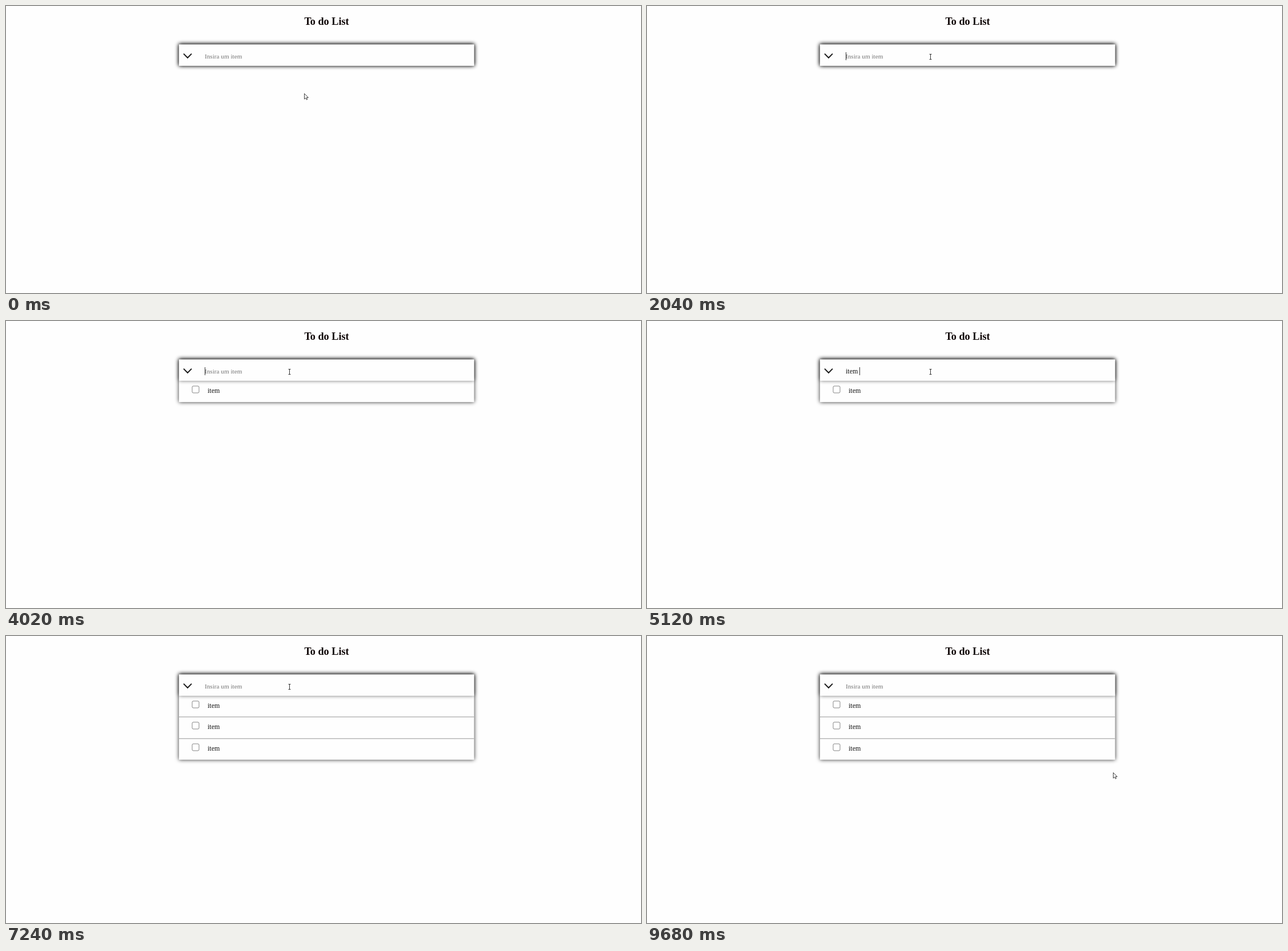
An HTML page for the animation above (9.78 s loop, 1112 by 503 pixels).

```html
<!DOCTYPE html>
<html lang="pt">
<head>
<meta charset="utf-8">
<title>To do List</title>
<style>
  html, body { margin: 0; width: 100%; height: 100%; overflow: hidden; background: #fefefe; }
  svg { display: block; width: 100vw; height: 100vh; }
  text { font-family: "Liberation Serif", "Times New Roman", serif; font-size: 12px; fill: #111; white-space: pre; }
  .title { font-size: 18.2px; font-weight: bold; fill: #0d0404; text-anchor: middle; }
  .hint { font-size: 11.22px; fill: #757575; }
  .paper { fill: #fefefe; }
</style>
</head>
<body>
<svg viewBox="0 0 1112 503">
  <defs>
    <filter id="blur" filterUnits="userSpaceOnUse" x="270" y="40" width="590" height="220">
      <feGaussianBlur stdDeviation="3.75"/>
    </filter>
  </defs>
  <text class="title" x="561.5" y="32.5">To do List</text>

  <rect id="listShadow" x="302.9" y="67.4" width="516.8" filter="url(#blur)" fill-opacity=".85"/>
  <rect id="list" class="paper" x="302.9" y="67.4" width="516.8"/>
  <rect x="302.9" y="66.4" width="516.8" height="37.4" filter="url(#blur)" fill-opacity=".75"/>
  <rect class="paper" x="302.9" y="67.4" width="516.8" height="37.4"/>
  <g id="rows"></g>

  <path d="M311 83.6L318 90.8L325 83.6" fill="none" stroke="#1c1c1c" stroke-width="2"/>
  <text id="hint" class="hint" x="348" y="92">Insira um item</text>
  <text id="typed" x="348" y="92"></text>
  <rect id="caret" y="81" width="1" height="14" fill="#333"/>
  <path id="remove" d="M767.4 115.7L778 126.3M778 115.7L767.4 126.3" stroke="#9fd3ee" stroke-width="1.2"/>

  <path id="arrow" d="M.5 .5V10.2L2.8 8.1L4.3 11.3L5.8 10.6L4.4 7.5H7.4Z" fill="#fff" stroke="#222" stroke-width=".85"/>
  <path id="beam" d="M-2 -4.5H2M-2 4.5H2M0 -4.5V4.5" fill="none" stroke="#333"/>
</svg>
<script>
const LOOP = 9780, TOP = 67.4, ROW = 37.35, WORD = "item ";
const $ = id => document.getElementById(id);
const show = (el, on) => el.setAttribute("visibility", on ? "visible" : "hidden");
const place = (el, x, y) => el.setAttribute("transform", `translate(${x} ${y})`);

const rows = [0, 1, 2].map(i => {
  const g = document.createElementNS("http://www.w3.org/2000/svg", "g");
  const line = i ? '<rect x="302.9" y="104" width="516.8" height="1.5" fill="#b8b8b8"/>' : "";
  g.innerHTML = line +
    '<rect x="326" y="114" width="12" height="12" rx="2" fill="#fff" stroke="#858585"/>' +
    '<text x="353" y="126">item</text>';
  place(g, 0, Math.round(i * ROW));
  $("rows").append(g);
  return g;
});

const enters = [4020, 5420, 6720];
const typing = [[2240, 2610], [4720, 5120], [6000, 6360]];
// The caret toggles at each of these times, starting hidden.
const blinks = [1020, 1550, 2040, 3140, 3660, 4550, 4720, 5950, 6000, 7240, 7770, 8300, 8810, 9340];

// Pointer moves: start, end, steps, from, to, easing exponents
const moves = [
  [20, 500, 13, [522, 153], [497, 94], 1, 1],
  [660, 720, 3, [497, 94], [497, 91], 1, 1],
  [980, 1170, 5, [497, 91], [497, 89], 1, 1],
  [8300, 8610, 9, [497, 89], [812, 241], 1.2, 1.4],
  [9510, 9680, 3, [812, 241], [815.5, 239], 1, 1]
];

function stepped(t, start, end, steps) {
  if (t < start) return 0;
  return Math.min(steps, 1 + Math.floor((t - start) / (end - start) * (steps - 1)));
}

function pointer(t) {
  let pos = moves[0][3];
  for (const [start, end, steps, from, to, ex, ey] of moves) {
    if (t < start) break;
    const p = stepped(t, start, end, steps) / steps;
    pos = [from[0] + (to[0] - from[0]) * p ** ex, from[1] + (to[1] - from[1]) * p ** ey];
  }
  return pos;
}

function draw(t) {
  const count = enters.filter(e => t >= e).length;
  const span = typing[count];
  const letters = span ? stepped(t, ...span, WORD.length) : 0;
  const bottom = TOP + ROW * (count + 1);

  for (const id of ["list", "listShadow"]) $(id).setAttribute("height", bottom - TOP);
  rows.forEach((row, i) => show(row, i < count));

  $("typed").textContent = WORD.slice(0, letters);
  show($("hint"), !letters);
  const width = letters ? $("typed").getComputedTextLength() : 0;
  $("caret").setAttribute("x", 348 + Math.round(width));
  show($("caret"), blinks.filter(b => t >= b).length % 2);
  show($("remove"), t >= 8440 && t < 8575);

  const [x, y] = pointer(t);
  const isBeam = y < 105 && y > TOP && !(t >= 1070 && t < 1120);
  show($("beam"), isBeam);
  show($("arrow"), !isBeam);
  place($("beam"), Math.floor(x) - .5, Math.round(y));
  place($("arrow"), Math.round(x), Math.round(y));
}

const began = performance.now();
function tick() {
  draw((performance.now() - began) % LOOP);
  requestAnimationFrame(tick);
}
tick();
</script>
</body>
</html>
```
